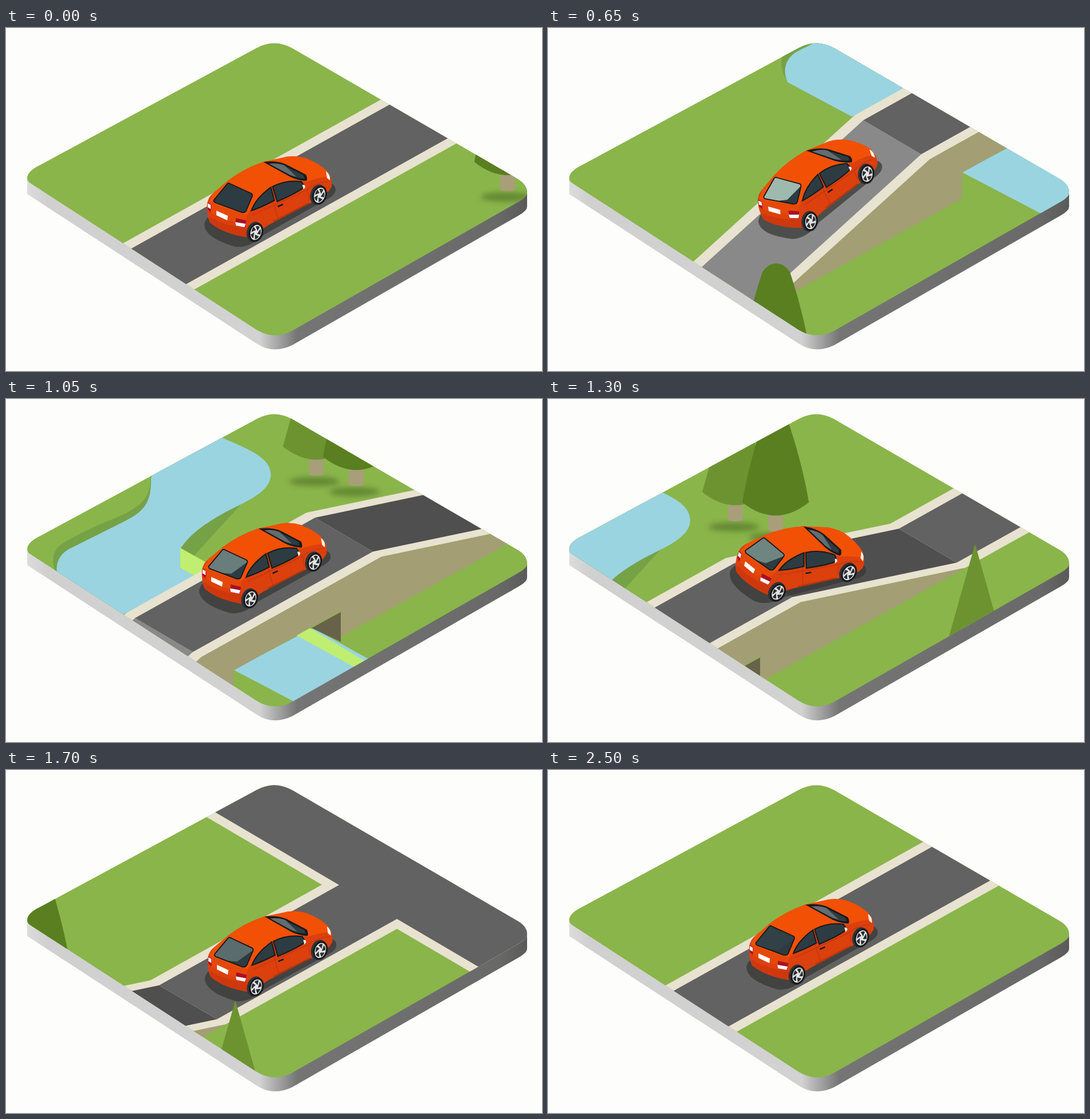
Recreate the animation shown at these times as an HTML page with a canvas. Size 935 by 599 pixels, loop 2550 ms.

```html
<!DOCTYPE html>
<html>
<head>
<meta charset="utf-8">
<style>
html, body { margin: 0; width: 100%; height: 100%; overflow: hidden; background: #fdfdfb; }
canvas { display: block; }
</style>
</head>
<body>
<canvas id="stage" width="935" height="599"></canvas>
<script>
const ctx = document.getElementById('stage').getContext('2d');
const LOOP = 2550, STEP = 50, SLOPE = 0.558, TOP = 100;
const RAMP = 727, DECK = 1012, DECK_END = 1326, FLAT = 1613;
const GREEN = '#8ab54a', KERB = '#e8e2d0', ROAD = '#626262', WATER = '#9ad4e1', OLIVE = '#a39e74';

// Smooth curve through [time, value] keys.
function curve(...keys) {
  const slope = i => {
    const a = keys[Math.max(i - 1, 0)], b = keys[Math.min(i + 1, keys.length - 1)];
    return (b[1] - a[1]) / (b[0] - a[0]);
  };
  return t => {
    let i = 0;
    while (i < keys.length - 2 && t >= keys[i + 1][0]) i++;
    const [t0, a] = keys[i], [t1, b] = keys[i + 1], d = t1 - t0, u = (t - t0) / d;
    return a + u * u * (3 - 2 * u) * (b - a)
      + d * u * (1 - u) * ((1 - u) * slope(i) - u * slope(i + 1));
  };
}

const travel = curve([0, 0], [650, 477], [1050, 802], [1300, 1016], [1700, 1361], [2100, 1842], [2550, 2300]);
const lift = curve([0, 0], [400, 2], [520, 20], [650, 61], [850, 92], [1050, 101], [1300, 61], [1700, 18], [2100, 8], [2550, 0]);
const carX = curve([0, 491.5], [350, 492], [650, 507.5], [1050, 482.5], [1300, 463], [1700, 492.5], [2100, 492.5], [2550, 491.5]);
const carY = curve([0, 324.5], [400, 322], [650, 296.5], [1050, 317], [1300, 321], [1700, 347], [2100, 335.5], [2550, 324.5]);
const pitch = curve([0, 0], [400, 0], [520, -6], [650, -9.6], [800, -6], [900, -2], [1050, .4], [1150, 5], [1300, 15], [1420, 14], [1560, 6], [1700, .6], [2100, 0], [2550, 0]);
const glare = curve([0, 0], [400, .15], [650, .72], [1050, .38], [1300, .42], [1700, .28], [2100, .2], [2550, 0]);

const surface = new Path2D('M37 262Q37 250 60 239L437 35Q468 18 499 35L890 262Q910 273 909 288Q909 295 895 303L497 530Q466 545 437 527L44 272Q37 268 37 262Z');
const side = new Path2D('M37 262L37 290L437 551Q466 570 499 554L895 327Q909 319 909 312L909 284L467 500Z');

function fill(shape, color) {
  ctx.fillStyle = color;
  ctx.fill(typeof shape === 'string' ? new Path2D(shape) : shape);
}

function line(d, color, width) {
  ctx.strokeStyle = color;
  ctx.lineWidth = width;
  ctx.stroke(new Path2D(d));
}

function oval(x, y, rx, ry, color, turn = 0) {
  ctx.beginPath();
  ctx.ellipse(x, y, rx, ry, turn, 0, 7);
  ctx.fillStyle = color;
  ctx.fill();
}

function poly(points, color) {
  ctx.beginPath();
  points.forEach(p => ctx.lineTo(...p));
  ctx.fillStyle = color;
  ctx.fill();
}

// s runs along the road, k across it, h is height above ground.
const at = (s, k, h = 0) => [s + 131 * k, 489.8 - SLOPE * s + 77 * k - h];
const profile = [[-600, 0], [RAMP, 0], [DECK, TOP], [DECK_END, TOP], [FLAT, 0], [3900, 0]];

function strip(a, b, k0, k1, color) {
  const part = profile.slice(a, b + 1);
  poly([...part.map(([s, h]) => at(s, k0, h)), ...part.reverse().map(([s, h]) => at(s, k1, h))], color);
}

function crossing(s0, s1, color) {
  poly([at(s0, -5), at(s1, -5), at(s1, 5), at(s0, 5)], color);
}

// Draws with coordinates as they appear on screen at the given scroll state.
function placed(x, v, draw) {
  ctx.save();
  ctx.translate(x, -SLOPE * x - v);
  draw();
  ctx.restore();
}

function tree(x, y, dome) {
  ctx.save();
  ctx.translate(x, y);
  ctx.filter = 'blur(5px)';
  oval(-3, 10, 44, 8, 'rgba(70,100,35,.55)');
  ctx.filter = 'none';
  fill('M-13 -40H13V-2Q0 2 -13 -2Z', '#a89e7a');
  if (dome) fill('M-58 -51C-50 -100 -36 -150 -24 -186Q-14 -201 0 -201Q14 -201 24 -186C36 -150 50 -100 58 -51Q0 -5 -58 -51Z', '#597f20');
  else fill('M-58 -51L0 -257L58 -51Q0 -5 -58 -51Z', '#6d9331');
  ctx.restore();
}

function river() {
  fill('M205 376L93 316Q74 285 88 262Q95 250 165 218C225 195 253 180 252 138L300 0L450 140L304 300Z', '#76a247');
  fill('M205 376L93 316C82 292 92 272 110 262L190 222C235 200 254 190 253 138L300 0L378 68C415 85 462 100 462 132C462 165 410 182 375 202C340 222 318 240 304 262V295L330 309Z', WATER);
  fill('M304 260L370 297L350 321L304 295Z', '#bfee70');
}

function canal() {
  fill('M397 473L535 400L905 605L797 683Z', WATER);
  fill('M505 412L530 400L918 632L895 626Z', '#bfee70');
  fill('M533 400L584 372V424Z', '#676249');
}

function road() {
  crossing(1912, 2047, KERB);
  strip(0, 5, 0, 1, KERB);
  const wall = [at(RAMP, 1), at(1068, 1), at(1068, 1, 45), at(1255, 1, 45), at(1255, 1)];
  poly([...wall, at(FLAT, 1), at(DECK_END, 1, TOP), at(DECK, 1, TOP)], OLIVE);
  crossing(1927, 2032, ROAD);
  [ROAD, '#898989', '#626262', '#4f4f4f', ROAD].forEach((c, i) => strip(i, i + 1, .115, .885, c));
}

function wheel(x, y, spin) {
  oval(x - 3, y - 1, 13, 18, '#30343a', .3);
  oval(x, y, 12.5, 17, '#191b1d', .3);
  ctx.save();
  ctx.translate(x, y);
  ctx.rotate(.3);
  ctx.scale(.7, 1);
  oval(0, 0, 13.5, 13.5, '#e4e4e4');
  ctx.rotate(spin);
  for (let i = 0; i < 5; i++) {
    ctx.rotate(Math.PI * .4);
    fill('M3 -3L5 -11Q0 -13 -5 -10Z', '#2b2e31');
  }
  ctx.restore();
}

function car(t) {
  ctx.save();
  ctx.translate(carX(t), carY(t));
  ctx.rotate(pitch(t) * Math.PI / 180);
  ctx.translate(-491.5, -324.5);
  fill('M346 342Q350 326 370 322L540 266Q576 268 575 283Q574 293 556 301L450 361Q425 385 400 382Q345 366 346 342Z', 'rgba(55,55,52,.72)');

  fill('M351 306Q353 295 362 288L388 266Q414 246 448 234L480 227Q500 221 522 227Q548 237 560 250Q570 263 568 277L563 285L534 304L460 343L424 366Q380 360 356 340Q349 325 351 306Z', '#db400d');
  fill('M362 288L388 266Q414 246 448 234L480 227Q500 221 522 227Q548 237 560 250L562 260Q540 262 524 269Q500 263 466 276Q440 290 428 315L421 326Q385 318 354 303Z', '#f25005');
  fill('M354 303Q386 319 421 326L417 343Q382 338 352 319Z', '#e6480a');
  fill('M355 329Q380 346 420 350L422 365Q380 360 356 340Z', '#cf380c');
  line('M430 327L524 283Q540 270 562 268M466 303L475 334M526 283L529 300', '#bd330b', 1);
  line('M466 338L528 306', '#b7320c', 2);

  const rear = new Path2D('M386 272Q388 270 391 272L428 289Q431 291 429 295L419 319Q417 323 411 322L365 305Q361 303 363 300Z');
  fill(rear, '#2d3c42');
  ctx.save();
  ctx.clip(rear);
  ctx.globalAlpha = glare(t);
  fill('M350 310L384 265L435 289L402 313Z', '#cbe9d9');
  ctx.restore();
  ctx.strokeStyle = '#151719';
  ctx.lineWidth = 1.8;
  ctx.stroke(rear);

  fill('M449 234Q472 231 488 238L523 256Q527 264 524 267Q508 266 496 260Z', '#17191a');
  fill('M459 237Q476 235 489 242L519 257L521 263Q508 263 498 258Z', '#2d3c42');
  fill('M459 237Q475 235 486 240L507 260L496 257Z', '#626d71');
  for (const d of ['M428 319Q435 298 462 278L468 301Q448 312 428 319Z', 'M465 277Q487 265 515 268L521 277Q510 287 473 303Z']) {
    fill(d, '#2d3c42');
    line(d, '#17191a', 2);
  }
  line('M474 312L483 308', '#17191a', 2.5);
  fill('M517 274Q522 273 522 278L519 282Z', '#f7efe6');

  fill('M367 319L387 328L386 336L367 327Z', '#fff');
  fill('M401 332L419 336L417 349L400 345Z', '#a80f27');
  fill('M400 339L418 342L416 348L401 345Z', '#fff');
  fill('M352 304L358 309L357 322L352 317Z', '#a80f27');
  fill('M352 306L357 309V316L352 313Z', '#fff');
  fill('M558 250Q566 255 565 266L560 262Z', '#fff4e6');

  const spin = travel(t) / 16;
  wheel(436, 357, spin);
  wheel(547, 292, spin);
  ctx.restore();
}

function base() {
  ctx.fillStyle = '#fdfdfb';
  ctx.fillRect(0, 0, 935, 599);
  const shade = ctx.createLinearGradient(37, 0, 909, 0);
  [[0, '#dcdcdc'], [.04, '#d0d0d0'], [.465, '#d2d2d2'], [.54, '#757575'], [.94, '#696969'], [1, '#5a5a5a']]
    .forEach(stop => shade.addColorStop(...stop));
  fill(side, shade);
  fill(surface, GREEN);
}

function render(now) {
  const t = Math.floor(now % LOOP / STEP) * STEP;
  base();
  ctx.save();
  ctx.clip(surface);
  ctx.translate(-travel(t), SLOPE * travel(t) + lift(t));
  placed(802, 101, () => {
    river();
    tree(541, 134, false);
    tree(611, 152, true);
    canal();
  });
  road();
  placed(0, 0, () => tree(875, 285, true));
  placed(1016, 61, () => tree(745, 510, false));
  ctx.restore();
  car(t);
  requestAnimationFrame(render);
}

requestAnimationFrame(render);
</script>
</body>
</html>
```
